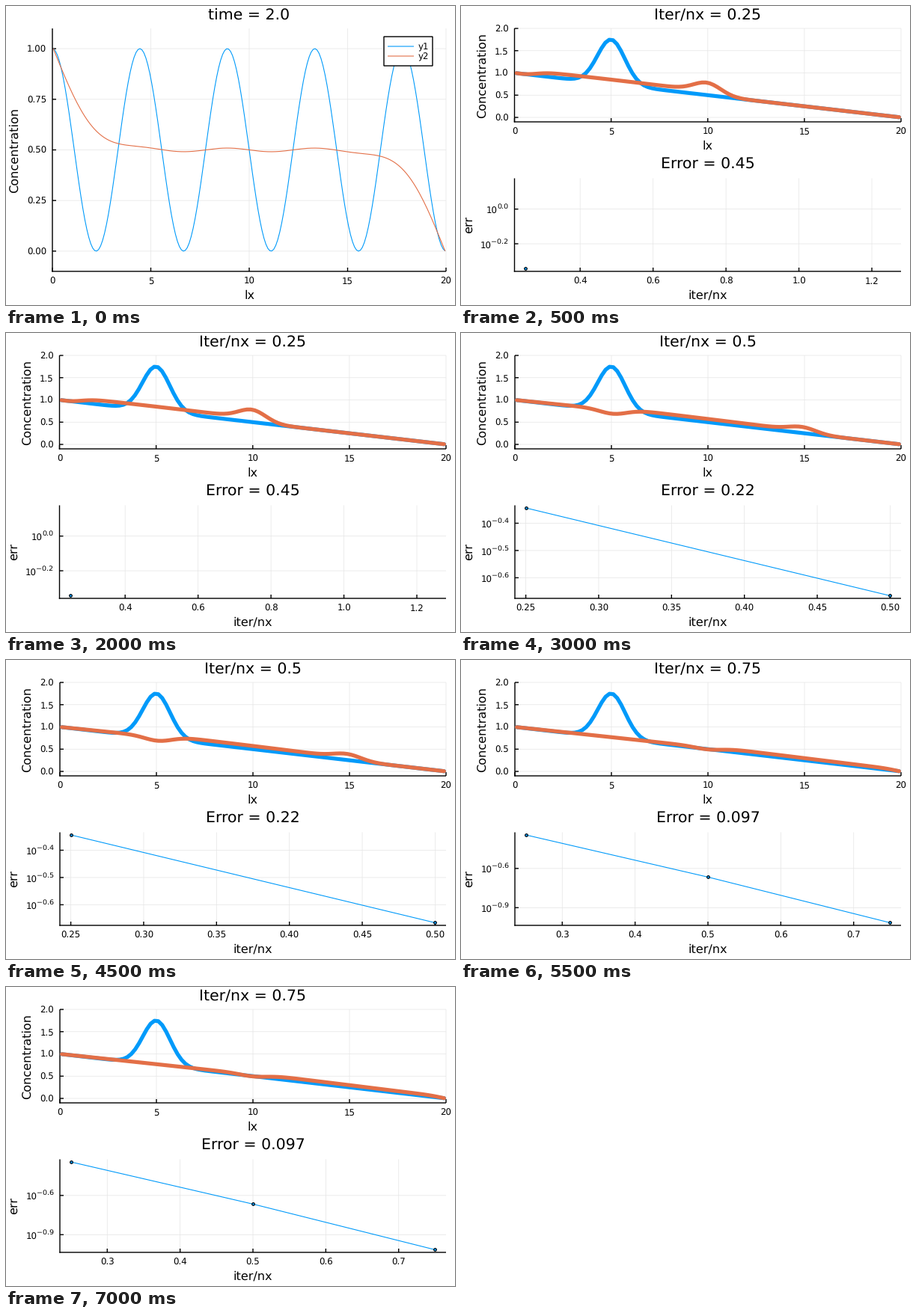
Write a matplotlib script that moves like this. It is 600 by 400 pixels and loops after 8000 ms.

```python
import numpy as np
import matplotlib.pyplot as plt
from matplotlib.animation import FuncAnimation
from matplotlib.patches import Rectangle

W, H, DPI = 600, 400, 100
PX = 72 / DPI  # points per pixel
BLUE, ORANGE, GRID = "#009AFA", "#E36F47", "#E6E6E6"
TITLE, GUIDE, TICK, SUP = 20.5, 16.1, 11.7, 9.5
THIN, THICK, AXIS = 1.1, 5.2, 1.4
LX = 20.0

plt.rcParams["font.family"] = "DejaVu Sans"
plt.rcParams["text.hinting"] = "none"


def cells(nx):
    dx = LX / nx
    return dx, np.linspace(dx / 2, LX - dx / 2, nx)


def diffuse(c, dx, total):
    """Explicit diffusion with the end values held fixed."""
    c = c.copy()
    dt = dx * dx / 2
    for _ in range(round(total / dt)):
        c[1:-1] += dt * np.diff(c, 2) / dx**2
    return c


def relax(c, dx, checks, step):
    """Damped-wave iterations towards the steady state, saved every `step`."""
    c = c.copy()
    rho = (LX / (2 * np.pi)) ** 2
    dtau = dx * np.sqrt(rho)
    q = np.zeros(len(c) - 1)
    saved = []
    for _ in range(checks):
        for _ in range(step):
            q -= dtau / (rho + dtau) * (q + np.diff(c) / dx)
            c[1:-1] -= dtau * np.diff(q) / dx
        saved.append(c.copy())
    return saved


class Panel:
    """A plot area placed in stage pixels, y pointing down."""

    def __init__(self, ax, box, xlim, ylim):
        self.ax, self.box, self.xlim, self.ylim = ax, box, xlim, ylim
        left, top, right, bottom = box
        self.clip = Rectangle((left, top), right - left, bottom - top,
                              transform=ax.transData)

    def x(self, v):
        left, _, right, _ = self.box
        a, b = self.xlim
        return left + (np.asarray(v) - a) / (b - a) * (right - left)

    def y(self, v):
        _, top, _, bottom = self.box
        a, b = self.ylim
        return bottom - (np.asarray(v) - a) / (b - a) * (bottom - top)

    def stroke(self, xs, ys, color, width, z):
        return self.ax.plot(xs, ys, color=color, lw=width * PX, zorder=z,
                            solid_capstyle="butt", snap=False)[0]

    def text(self, x, y, s, size, ha="center", **kw):
        self.ax.text(x, y, s, fontsize=size * PX, ha=ha, va="baseline",
                     color="black", zorder=6, **kw)

    def frame(self, xticks, xfmt, yticks, yfmt=None, tick=5):
        left, top, right, bottom = self.box
        for v in xticks:
            px = self.x(v)
            self.stroke([px, px], [top, bottom], GRID, 0.75, 1)
            self.stroke([px, px], [bottom - tick, bottom], "black", AXIS, 2)
            self.text(px, bottom + 17, format(v, xfmt), TICK)
        for v in yticks:
            py = self.y(v)
            self.stroke([left, right], [py, py], GRID, 0.75, 1)
            self.stroke([left, left + tick], [py, py], "black", AXIS, 2)
            if yfmt:
                self.text(left - 8, py + 4.8, format(v, yfmt), TICK, "right")
            else:
                self.power(left - 8, py, v)
        self.stroke([left, left], [top, bottom + AXIS / 2], "black", AXIS, 2)
        self.stroke([left - AXIS / 2, right], [bottom, bottom],
                    "black", AXIS, 2)

    def power(self, x, y, v):
        exponent = f"{v:.1f}".replace("-", "\u2212")
        advance = SUP * (2.43 if v < 0 else 1.59)
        self.text(x, y - 0.5, exponent, SUP, "right")
        self.text(x - advance + 0.6, y + 6.4, "10", TICK, "right")

    def labels(self, title, xlabel, ylabel, ylabel_x):
        left, top, right, bottom = self.box
        mid = (left + right) / 2
        self.text(mid, top - 12.3, title, TITLE)
        self.text(mid, bottom + 37, xlabel, GUIDE)
        self.text(ylabel_x, (top + bottom) / 2, ylabel, GUIDE,
                  rotation=90, rotation_mode="anchor")

    def curve(self, xs, ys, color, width):
        line = self.stroke(self.x(xs), self.y(ys), color, width, 3)
        line.set_solid_capstyle("round")
        line.set_solid_joinstyle("round")
        line.set_clip_path(self.clip)


def widen(a, b):
    pad = 0.03 * (b - a)
    return a - pad, b + pad


def stage(fig):
    ax = fig.add_axes([0, 0, 1, 1])
    ax.set(xlim=(0, W), ylim=(H, 0))
    ax.axis("off")
    ax.set_autoscale_on(False)
    return ax


def diffusion_scene(fig):
    ax = stage(fig)
    dx, x = cells(200)
    start = 0.5 * np.cos(9 * np.pi * x / LX) + 0.5
    p = Panel(ax, (62, 30, 588, 355), (0, LX), (-0.1, 1.1))
    p.frame(range(0, 21, 5), "d", np.arange(5) / 4, ".2f")
    p.labels("time = 2.0", "lx", "Concentration", 15.8)
    p.curve(x, start, BLUE, THIN)
    p.curve(x, diffuse(start, dx, 2.0), ORANGE, THIN)
    ax.add_patch(Rectangle((505, 41), 65, 39, fc="white", ec="black",
                           lw=AXIS * PX, zorder=4, snap=False))
    for name, y, color in (("y1", 54, BLUE), ("y2", 67, ORANGE)):
        p.stroke([510, 545], [y, y], color, THIN, 5)
        p.text(551, y + 4.5, name, TICK, "left")
    return ax


def relax_scene(fig, x, start, c, iters, errs, left, xticks, xfmt, yticks):
    ax = stage(fig)
    top = Panel(ax, (left, 30, 588, 155), (0, LX), (-0.1, 2))
    top.frame(range(0, 21, 5), "d", np.arange(5) / 2, ".1f")
    top.labels(f"Iter/nx = {iters[-1]:g}", "lx", "Concentration", 32.9)
    top.curve(x, start, BLUE, THICK)
    top.curve(x, c, ORANGE, THICK)

    logs = np.log10(errs)
    if len(errs) == 1:  # a lone point gets a span of one unit
        xlim = widen(iters[0], iters[0] + 1)
        ylim = widen(logs[0], np.log10(errs[0] + 1))
    else:
        xlim, ylim = widen(iters[0], iters[-1]), widen(logs[-1], logs[0])
    low = Panel(ax, (left, 230.5, 588, 355), xlim, ylim)
    low.frame(xticks, xfmt, yticks)
    low.labels(f"Error = {errs[-1]:.2g}", "iter/nx", "err", 16)
    low.curve(iters, logs, BLUE, THIN)
    ax.plot(low.x(iters), low.y(logs), "o", ms=3.7 * PX, mfc=BLUE,
            mec="black", mew=THIN * PX, zorder=4, snap=False)
    return ax


fig = plt.figure(figsize=(W / DPI, H / DPI), dpi=DPI, facecolor="white")

NX = 100
dx, x = cells(NX)
bump = 1 + np.exp(-(x - LX / 4) ** 2) - x / LX
states = relax(bump, dx, 3, NX // 4)
iters = [0.25, 0.5, 0.75]
errs = [0.453, 0.2158, 0.0966]
looks = [
    (71.5, [0.4, 0.6, 0.8, 1.0, 1.2], ".1f", [0.0, -0.2]),
    (72, [0.25, 0.3, 0.35, 0.4, 0.45, 0.5], ".2f", [-0.4, -0.5, -0.6]),
    (72, [0.3, 0.4, 0.5, 0.6, 0.7], ".1f", [-0.6, -0.9]),
]

scenes = [diffusion_scene(fig)]
for n, look in enumerate(looks, 1):
    scenes.append(relax_scene(fig, x, bump, states[n - 1],
                              iters[:n], errs[:n], *look))


def show(i):
    """The first scene lasts one step, the others five each."""
    current = (i + 4) // 5
    for n, ax in enumerate(scenes):
        ax.set_visible(n == current)
    return scenes


anim = FuncAnimation(fig, show, frames=16, interval=500,
                     init_func=lambda: show(0), repeat=True, repeat_delay=0,
                     blit=False)
plt.show()
```
